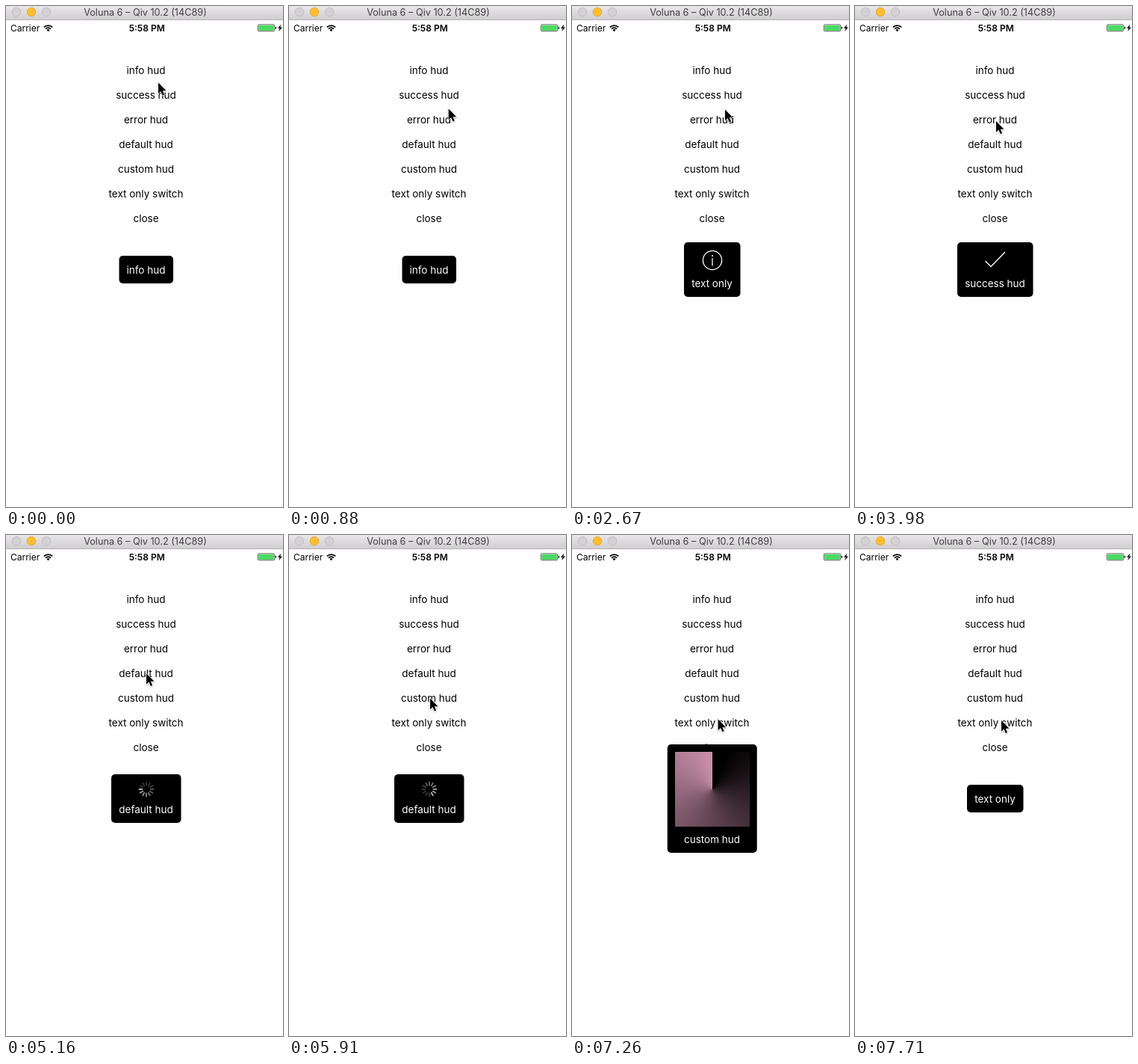
An HTML page for the animation above (8 s loop, 371 by 670 pixels).

```html
<!DOCTYPE html>
<html lang="en">
<head>
<meta charset="utf-8">
<title>HUD demo</title>
<style>
  html, body { margin: 0; width: 100%; height: 100%; overflow: hidden; background: #fefefe; }
  svg { display: block; width: 371px; height: 670px; font-family: Inter, Roboto, sans-serif; }
  text { text-anchor: middle; }
  .label { font-size: 13.5px; }
  .status { font-size: 12px; }
  .line { fill: none; stroke: #fff; stroke-width: 1.3; }
  .fan { width: 100px; height: 100px; background: conic-gradient(#000 22deg, #cc90ad 360deg); }
</style>
</head>
<body>
<svg viewBox="0 0 371 670">
  <defs>
    <linearGradient id="bar" x2="0" y2="1">
      <stop stop-color="#e9e7e9"/>
      <stop offset="1" stop-color="#d0ced0"/>
    </linearGradient>
    <filter id="shadow" x="-50%" y="-50%" width="200%" height="200%">
      <feDropShadow dx="0" dy="1" stdDeviation="0.8" flood-opacity=".3"/>
    </filter>
  </defs>
  <rect width="371" height="670" fill="#fefefe"/>

  <!-- window title -->
  <rect width="371" height="18" fill="url(#bar)"/>
  <rect y="18" width="371" height="1" fill="#b4b2b4"/>
  <g stroke-width=".8">
    <circle cx="14" cy="8" r="5.8" fill="#d3d1d3" stroke="#bab8ba"/>
    <circle cx="34" cy="8" r="5.8" fill="#ffbe2f" stroke="#e0a126"/>
    <circle cx="54" cy="8" r="5.8" fill="#d3d1d3" stroke="#bab8ba"/>
  </g>
  <text x="186.5" y="13" font-size="12.7" fill="#404040">Voluna 6 – Qiv 10.2 (14C89)</text>

  <!-- status bar -->
  <text class="status" x="6" y="33.5" style="text-anchor:start">Carrier</text>
  <g fill="none" stroke="#000" stroke-width="1.8">
    <path d="M50.8 28.4a8.1 8.1 0 0 1 11.4 0"/>
    <path d="M53 30.7a5 5 0 0 1 7 0"/>
  </g>
  <path d="M56.5 34.2l-2-2.1a2.8 2.8 0 0 1 4 0z"/>
  <text class="status" x="188.7" y="33.5" font-weight="600">5:58 PM</text>
  <rect x="337.3" y="24.8" width="22.4" height="9" rx="1.6" fill="#fff" stroke="#222" stroke-width=".7"/>
  <rect x="338.2" y="25.7" width="20.6" height="7.2" rx=".8" fill="#4cd964"/>
  <path d="M360.7 27.6a1.8 1.8 0 0 1 0 3.5z"/>
  <path d="M368.3 24.5l-4.3 5.3h2.6l-1.3 4.2 4.7-5.6h-2.7z"/>

  <g id="menu" class="label"></g>
  <g id="hud"></g>
  <path id="cursor" d="M0 0V14.8L3.4 11.6 5.8 17 8.1 16 5.8 10.8H10.5Z"
        stroke="#fff" stroke-width="1.2" paint-order="stroke" filter="url(#shadow)"/>
</svg>
<script>
const LOOP = 8000, TICK = 143, CX = 187.5, CY = 340;
const byId = id => document.getElementById(id);

const items = ['info hud', 'success hud', 'error hud', 'default hud', 'custom hud', 'text only switch', 'close'];
byId('menu').innerHTML = items.map((s, i) => `<text x="${CX}" y="${91 + 33 * i}">${s}</text>`).join('');

const icons = {
  info: `<circle class="line" cx="188" cy="${CY}" r="12.6"/>
    <path class="line" d="M188 337.2V347.5"/><circle cx="188" cy="334" r="1.1" fill="#fff"/>`,
  check: '<path class="line" d="M174.5 341L182 348.5 201 329"/>',
  cross: '<path class="line" d="M177.5 329.5l21 21m0-21l-21 21"/>',
  fan: '<foreignObject x="137.5" y="290" width="100" height="100"><div xmlns="http://www.w3.org/1999/xhtml" class="fan"></div></foreignObject>',
  spinner: Array.from({ length: 12 }, (_, i) =>
    `<path class="spoke" d="M188 ${CY - 5.5}v-4" transform="rotate(${i * 30} 188 ${CY})"
      stroke="#fff" stroke-width="2" stroke-linecap="round"/>`).join('')
};

// start time, label, card width, card height, icon
const huds = [
  [0, 'info hud', 72.5, 37],
  [2220, 'text only', 75.5, 73, 'info'],
  [3400, 'success hud', 101.5, 73, 'check'],
  [4280, 'error hud', 80, 73, 'cross'],
  [4870, 'default hud', 93.5, 65, 'spinner'],
  [6210, 'custom hud', 120, 145, 'fan'],
  [7710, 'text only', 75.5, 37]
];

// start time, number of steps, end x, end y
const moves = [
  [150, 4, 217.5, 186.5],
  [737, 2, 213.7, 137.5],
  [1180, 2, 225.5, 247.5],
  [1780, 2, 211, 248],
  [2370, 3, 205, 138.5],
  [2960, 2, 195, 119.5],
  [3550, 4, 189, 154],
  [4430, 3, 188, 185],
  [5460, 3, 189, 218.5],
  [6510, 7, 196, 248]
];

function cursorAt(t) {
  let x = 204, y = 102.5;
  for (const [start, n, toX, toY] of moves) {
    if (t < start) break;
    const p = Math.min(n, Math.floor((t - start) / TICK) + 1) / n;
    const e = p * p * (3 - 2 * p);
    x += (toX - x) * e;
    y += (toY - y) * e;
  }
  return [x, y];
}

let shown = null;
function showHud(hud) {
  if (hud === shown) return;
  shown = hud;
  const [, label, w, h, icon] = hud;
  const top = 352.5 - h / 2;
  byId('hud').innerHTML =
    `<rect x="${CX - w / 2 + .25}" y="${top}" width="${w}" height="${h}" rx="5"/>
    ${icon ? icons[icon] : ''}
    <text class="label" x="${CX}" y="${top + h - 13.5}" fill="#fff">${label}</text>`;
}

function spin(t) {
  const head = 9 + Math.floor(Math.floor((t - 5160) / 147) * 147 / (1000 / 12));
  document.querySelectorAll('.spoke').forEach((spoke, i) => {
    const age = ((head - i) % 12 + 12) % 12;
    spoke.setAttribute('opacity', Math.max(.2, .68 - age * .06));
  });
}

function draw(now) {
  const t = (now + 8) % LOOP;
  showHud(huds.filter(h => h[0] <= t).pop());
  spin(t);
  byId('cursor').setAttribute('transform', `translate(${cursorAt(t)})`);
}

function frame() {
  draw(performance.now());
  requestAnimationFrame(frame);
}
frame();
</script>
</body>
</html>
```
